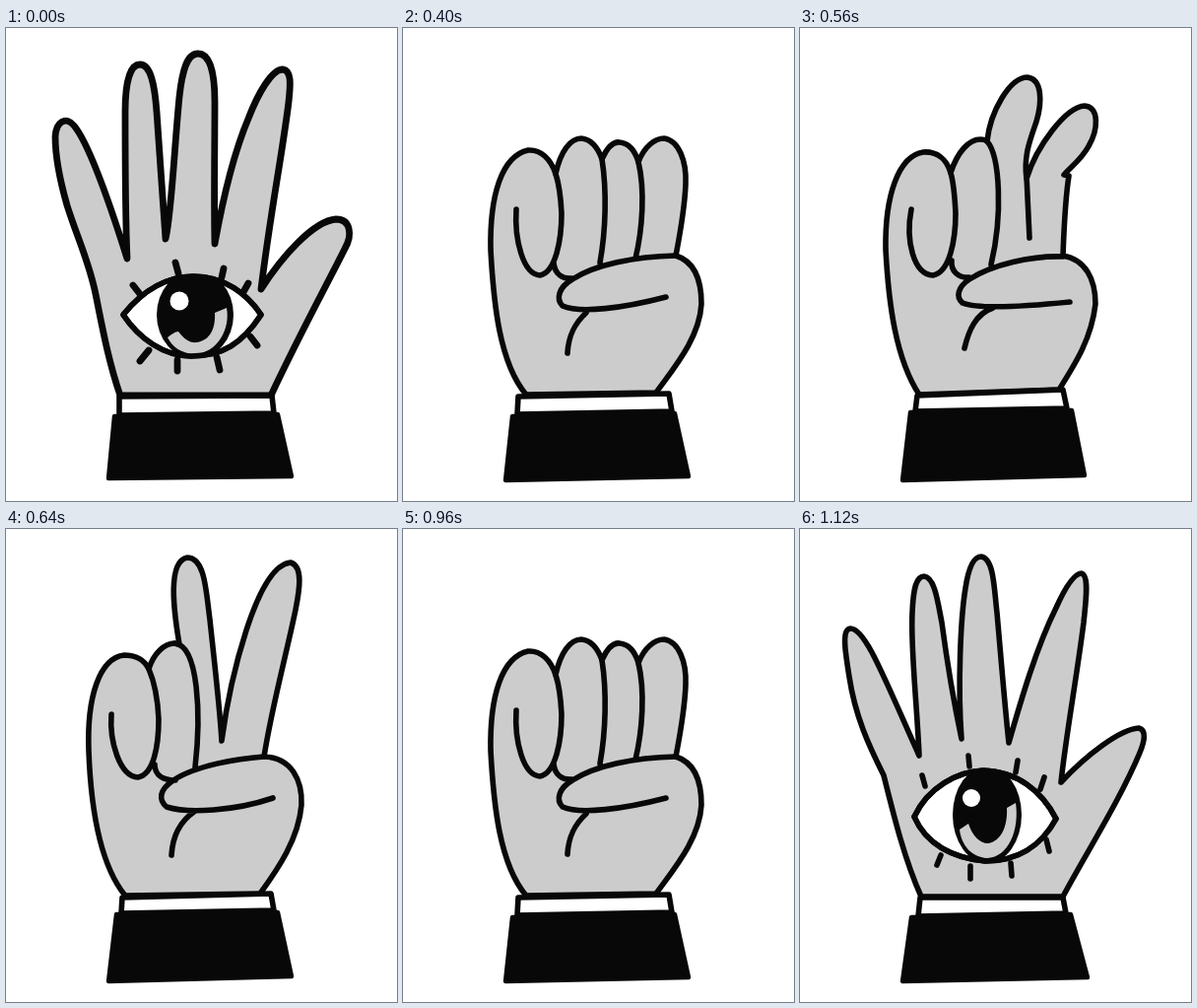
Animation of 397x480 px, one loop 1.2 s. Source, as an HTML page:

```html
<!DOCTYPE html>
<html lang="en">
<head>
<meta charset="utf-8">
<title>Hand signs</title>
<style>
html, body { margin: 0; width: 100%; height: 100%; overflow: hidden; background: #fff; }
svg { display: block; width: 100%; height: 100%; }
path { stroke: #080808; stroke-width: 5.6; stroke-linecap: round; stroke-linejoin: round; fill: none; }
use { fill: none; }
.skin { fill: #ccc; }
.white { fill: #fff; }
.lid { fill: inherit; }
.cuff { fill: #fff; stroke-width: 5.6; }
.sleeve { fill: #080808; stroke-width: 4.4; }
.dark { fill: #080808; stroke: none; }
.shine { fill: #fff; stroke: none; }
.grey { fill: #ccc; stroke: none; }
.bold path.skin, .bold .line, .bold .lid { stroke-width: 6.8; }
.bold .lash { stroke-width: 6.8; }
.pose { visibility: hidden; animation: 1200ms step-end infinite; }
#open { animation-name: open; }
#curl { animation-name: curl; }
#fist { animation-name: fist; }
#loosen { animation-name: loosen; }
#bent { animation-name: bent; }
#stretch { animation-name: stretch; }
#peace { animation-name: peace; }
#spread { animation-name: spread; }
@keyframes open { 0% { visibility: visible } 26.6667%, 100% { visibility: hidden } }
@keyframes curl {
  0% { visibility: hidden } 26.6667% { visibility: visible } 33.3333% { visibility: hidden }
  86.6667% { visibility: visible } 93.3333%, 100% { visibility: hidden }
}
@keyframes fist {
  0% { visibility: hidden } 33.3333% { visibility: visible } 40% { visibility: hidden }
  80% { visibility: visible } 86.6667%, 100% { visibility: hidden }
}
@keyframes loosen { 0% { visibility: hidden } 40% { visibility: visible } 46.6667%, 100% { visibility: hidden } }
@keyframes bent { 0% { visibility: hidden } 46.6667% { visibility: visible } 53.3333%, 100% { visibility: hidden } }
@keyframes stretch { 0% { visibility: hidden } 53.3333% { visibility: visible } 60%, 100% { visibility: hidden } }
@keyframes peace { 0% { visibility: hidden } 60% { visibility: visible } 80%, 100% { visibility: hidden } }
@keyframes spread { 0% { visibility: hidden } 93.3333%, 100% { visibility: visible } }
</style>
</head>
<body>
<svg viewBox="0 0 397 480" preserveAspectRatio="none">
  <defs>
    <path id="openLid" class="lid" d="M119 291C140 265 165 252 190 252C222 252 245 270 259 291C240 320 220 333 188 333C160 333 135 315 119 291Z"/>
    <path id="curlLid" class="lid" d="M117 293C140 272 165 264 190 264C222 264 245 278 260 295C240 315 220 323 190 324C160 323 135 312 117 293Z"/>
    <path id="spreadLid" class="lid" d="M116 292C130 262 160 246 186 245C220 246 245 265 260 294C245 322 220 337 188 337C155 334 128 320 116 292Z"/>
    <clipPath id="openClip"><use href="#openLid"/></clipPath>
    <clipPath id="curlClip"><use href="#curlLid"/></clipPath>
    <clipPath id="spreadClip"><use href="#spreadLid"/></clipPath>
  </defs>

  <g id="open" class="pose bold">
    <path class="skin" d="M116 373C104 338 98 305 91 270C84 236 72 212 62 180C54 152 50 128 50 110C51 95 61 89 69 99C84 117 106 180 123 234C121 190 121 130 121 85C121 55 126 37 136 37C147 37 151 58 153 85C156 130 159 170 162 214C168 190 171 120 176 70C179 42 184 26 195 26C207 26 212 45 212 75C212 120 211 180 212 219C219 180 230 130 246 92C256 66 270 42 281 42C290 43 289 57 287 75C281 125 268 190 259 265C280 232 312 196 335 194C350 194 352 210 344 224C325 262 297 313 269 373Z"/>
    <path class="cuff" d="M115 374L270 373L272 391L115 393Z"/>
    <path class="sleeve" d="M110 394L276 392L290 455L104 457Z"/>
    <use href="#openLid" class="white"/>
    <g clip-path="url(#openClip)">
      <ellipse class="dark" cx="192" cy="291" rx="39" ry="45"/>
      <path class="grey" d="M164 314C168 311 172 308 175 308C181 316 187 320 194 319C207 317 213 305 212 289L224 284C228 305 215 330 191 331C178 330 169 324 164 314Z"/>
    </g>
    <use href="#openLid"/>
    <circle class="shine" cx="176" cy="277" r="9.5"/>
    <path class="lash" d="M172 238L175 249M221 244L219 253M129 261L136 270M246 259L241 268M145 327L136 338M174 337L174 348M214 334L217 347M248 313L255 322"/>
  </g>

  <g id="curl" class="pose bold">
    <path class="skin" d="M121 371C106 345 96 310 92 275C88 240 76 215 77 180C79 140 95 103 109 97C118 95 121 104 121 114C126 85 142 56 156 57C167 58 164 80 164 100L163 134C169 100 183 48 215 48C232 49 231 68 224 88C211 128 207 150 208 185L210 224L214 195C220 135 255 70 293 66C307 68 305 85 295 101C278 125 279 155 274 188C285 180 308 182 322 194C340 215 338 250 323 282C308 315 287 337 264 367Z"/>
    <path class="white line" d="M274 190C273 210 276 222 284 230L259 262C267 240 271 220 274 190Z"/>
    <path class="line" d="M118 105C118 130 115 148 119 180C122 210 127 230 134 245M165 118C159 160 161 200 169 230M164 100L160 160M276 212C279 223 284 229 292 232"/>
    <path class="cuff" d="M121 373L267 368L270 387L118 390Z"/>
    <path class="sleeve" d="M113 391L274 388L288 453L100 460Z"/>
    <use href="#curlLid" class="white"/>
    <g clip-path="url(#curlClip)">
      <ellipse class="dark" cx="192" cy="292" rx="39" ry="46"/>
      <path class="grey" d="M216 290L222 285C225 300 221 311 214 319C218 308 219 299 216 290ZM168 320L174 313L181 321Z"/>
    </g>
    <use href="#curlLid"/>
    <ellipse class="shine" cx="175" cy="279" rx="7.5" ry="9.5"/>
    <path class="lash" d="M173 249L175 260M219 250L217 260M128 266L136 275M246 262L241 272M149 321L143 330M174 329L174 338M215 326L216 338M250 310L254 320"/>
  </g>

  <g id="fist" class="pose">
    <path class="skin" d="M125 372C98 340 92 280 89 225C88 170 100 130 127 124C140 123 150 133 155 148C160 125 170 112 181 112C192 113 198 122 202 133C207 122 213 115 220 116C230 117 236 126 239 136C245 120 256 112 265 112C280 114 288 135 287 158C286 185 281 210 277 231C296 237 303 255 303 280C301 315 275 345 257 370Z"/>
    <path d="M115 184C113 215 122 250 139 251C155 248 161 215 161 188C160 168 158 157 155 148M153 238C154 250 162 255 172 254M202 133C207 165 206 205 200 238M239 136C246 165 243 205 236 234M277 231C235 232 195 240 172 255C158 263 155 275 162 282C180 290 225 284 267 273M186 289C174 300 168 312 167 330"/>
    <path class="cuff" d="M117 374L270 371L273 389L116 392Z"/>
    <path class="sleeve" d="M111 394L276 391L290 455L104 459Z"/>
  </g>

  <g id="loosen" class="pose">
    <path class="skin" d="M123 372C98 338 91 280 88 225C87 170 100 130 126 125C140 124 150 133 154 147C160 125 171 112 182 112C192 113 198 121 201 131C206 117 213 109 221 110C231 111 237 121 239 132C246 115 258 106 267 107C282 109 289 132 287 155C284 185 279 208 274 231C294 236 302 255 302 280C300 315 276 344 259 370Z"/>
    <path d="M114 184C110 215 118 250 137 251C154 248 160 215 160 188C159 168 157 157 154 147M153 237C154 249 161 255 172 254M201 131C206 160 206 203 198 239M239 132C244 162 241 200 236 232M274 231C235 231 195 240 172 255C159 263 156 274 163 281C180 288 225 284 270 275M190 287C176 296 169 310 167 328"/>
    <path class="cuff" d="M118 374L269 370L272 388L116 391Z"/>
    <path class="sleeve" d="M112 392L276 390L290 455L104 459Z"/>
  </g>

  <g id="bent" class="pose">
    <path class="skin" d="M121 372C97 335 90 280 87 225C86 170 100 130 125 126C139 125 149 133 153 147C160 125 172 113 183 113C187 113 189 114 190 115C193 85 213 50 231 50C246 52 246 75 240 95C233 115 227 130 230 153C240 120 270 80 289 79C304 80 303 103 293 120C286 133 275 141 268 149L273 150C269 175 268 205 267 231C290 235 300 255 300 280C296 315 280 340 263 367Z"/>
    <path d="M113 184C107 215 115 250 135 251C152 248 158 215 158 188C157 168 156 157 153 147M154 236C153 246 160 254 172 253M190 115C203 130 206 190 194 240M230 150L233 213M267 232C235 231 195 240 172 255C160 263 158 273 165 279C180 285 225 283 274 278M196 284C178 290 171 308 167 325"/>
    <path class="cuff" d="M119 373L267 367L271 386L117 389Z"/>
    <path class="sleeve" d="M112 390L276 388L289 454L104 459Z"/>
  </g>

  <g id="stretch" class="pose">
    <path class="skin" d="M121 372C95 340 86 280 84 225C82 170 95 131 120 128C133 128 141 134 145 142C150 126 161 116 171 116L176 117C170 82 164 33 184 29C202 29 203 62 207 92C211 130 217 180 219 215C227 155 254 37 289 34C302 38 298 62 294 82C284 130 270 180 262 231C290 232 301 255 300 280C297 315 276 345 258 370Z"/>
    <path d="M107 188C105 215 115 251 134 252C150 249 155 220 155 193C154 170 151 156 145 142M151 239C151 250 160 255 172 255M171 116C196 118 198 190 192 242M262 231C235 233 192 240 170 255C155 265 155 275 163 282C185 289 233 286 271 273M191 287C175 298 169 314 168 331"/>
    <path class="cuff" d="M118 374L269 370L272 387L117 390Z"/>
    <path class="sleeve" d="M112 391L276 389L290 454L104 459Z"/>
  </g>

  <g id="peace" class="pose">
    <path class="skin" d="M121 373C95 340 86 280 84 225C82 170 95 130 120 127C133 127 140 133 144 141C149 125 160 115 170 115C174 115 175 116 177 117C174 80 172 30 193 26C210 28 207 60 210 90C213 130 218 180 220 215C226 150 245 30 281 27C295 30 292 55 290 75C283 125 270 180 262 231C290 232 301 255 300 280C297 315 275 345 256 370Z"/>
    <path d="M106 188C106 215 115 251 134 252C149 249 154 220 154 193C153 170 150 155 144 141M150 240C151 250 160 255 172 255M170 115C195 117 197 190 191 243M262 231C235 233 192 240 170 255C155 265 155 275 163 283C185 290 235 286 270 272M190 288C175 300 169 315 168 333"/>
    <path class="cuff" d="M118 374L269 371L273 388L117 391Z"/>
    <path class="sleeve" d="M111 392L276 390L290 453L104 459Z"/>
  </g>

  <g id="spread" class="pose">
    <path class="skin" d="M123 373C106 335 95 290 85 250C70 220 56 190 50 150C46 125 42 102 51 101C66 100 85 150 121 230C119 180 112 120 114 85C115 60 118 48 126 48C137 49 140 75 144 95C150 140 157 180 164 213C160 160 163 90 168 60C171 40 176 28 184 28C197 30 197 60 200 85C204 130 208 180 212 217C224 175 240 120 260 80C269 60 278 45 286 45C294 48 290 75 288 95C281 150 270 210 265 257C290 230 325 203 344 202C352 204 350 215 345 227C325 275 290 330 267 373Z"/>
    <path class="cuff" d="M122 374L267 374L270 390L120 393Z"/>
    <path class="sleeve" d="M113 394L275 391L292 455L104 459Z"/>
    <use href="#spreadLid" class="white"/>
    <g clip-path="url(#spreadClip)">
      <ellipse class="dark" cx="190" cy="290" rx="35" ry="49"/>
      <path class="grey" d="M162 305L171 299C175 311 182 319 191 319C204 317 211 302 210 283L219 278C223 305 212 333 190 334C174 333 164 321 162 305Z"/>
    </g>
    <use href="#spreadLid"/>
    <circle class="shine" cx="174" cy="273" r="9"/>
    <path d="M171 230L172 241M221 235L219 247M124 250L127 261M248 252L244 264M143 331L139 341M173 342L173 355M214 339L215 352M250 315L253 327"/>
  </g>
</svg>
</body>
</html>
```
